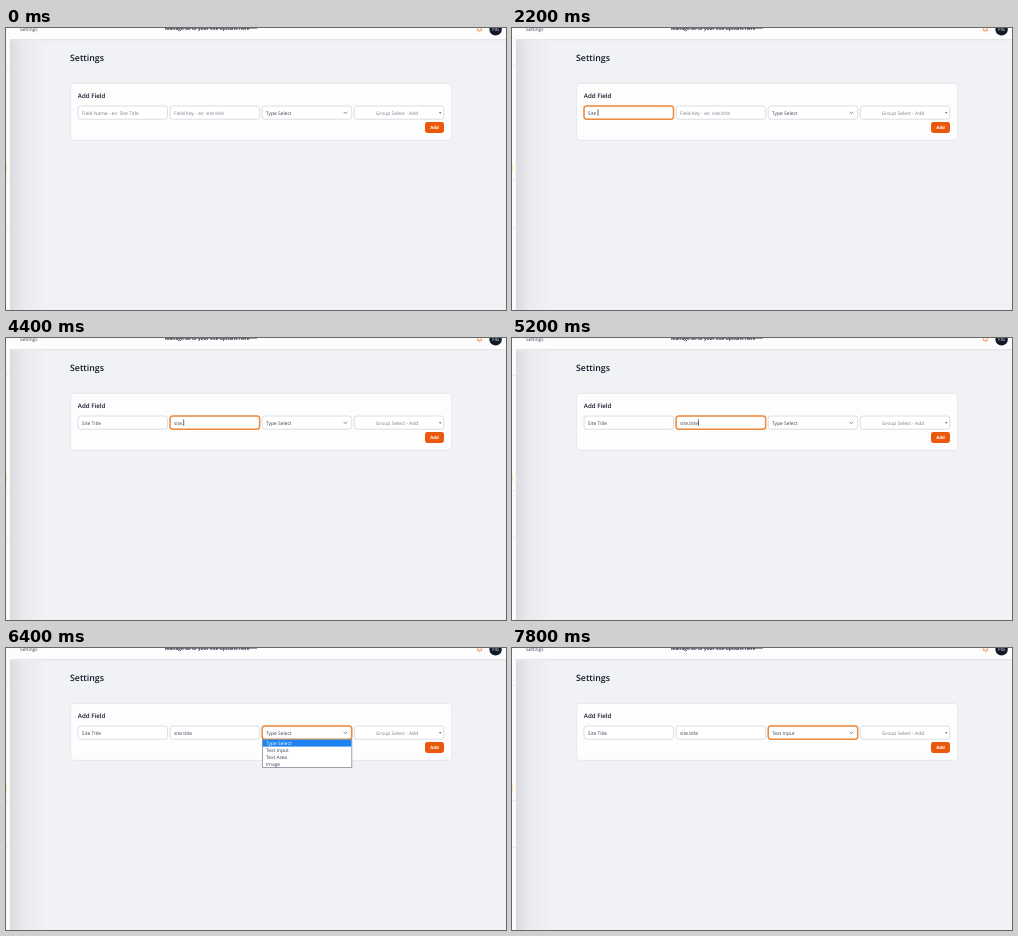
An HTML page that plays this animation: 500 by 282 pixels, repeating every 8 s.

```html
<!DOCTYPE html>
<html lang="en">
<head>
<meta charset="utf-8">
<title>Settings form</title>
<style>
  html, body { margin: 0; width: 100%; height: 100%; overflow: hidden; background: #f0f2f5; }
  svg { display: block; width: 500px; height: 282px; }
  text { font: 4.9px "Open Sans", "Noto Sans", sans-serif; fill: #374151; white-space: pre; text-rendering: geometricPrecision; }
  .bold { font-weight: 600; fill: #111827; }
  .white { fill: #fff; }
  .hint { fill: #7b818c; }
  .box { fill: #fff; stroke: #d3d6db; stroke-width: .8; }
  .ring { fill: none; stroke: #f08a3c; stroke-width: 1.5; }
  .line { fill: none; stroke: #4b5563; stroke-width: .7; stroke-linecap: round; stroke-linejoin: round; }
</style>
</head>
<body>
<svg viewBox="0 0 500 282">
  <defs>
    <linearGradient id="side"><stop stop-color="#d9dbde"/><stop offset=".35" stop-color="#e8eaed"/><stop offset="1" stop-color="#f0f2f5"/></linearGradient>
    <linearGradient id="under" x2="0" y2="1"><stop stop-color="#dfe1e4"/><stop offset="1" stop-color="#f0f2f5" stop-opacity="0"/></linearGradient>
  </defs>

  <rect width="500" height="282" fill="#f0f2f5"/>
  <rect x="4" width="36" height="282" fill="url(#side)"/>
  <rect x="4" y="11" width="496" height="3" fill="url(#under)"/>
  <rect width="500" height="11" fill="#fdfdfe"/>
  <rect width="3.6" height="282" fill="#fcfcfd"/>
  <path d="M0 37.5H3.6M0 152.5H3.6M0 199.5H3.6" stroke="#e5e7eb" stroke-width=".7"/>
  <rect y="136" width="1" height="8" fill="#fdeeb0"/>

  <text x="14" y="2.9" style="font-size:4.7px">Settings</text>
  <text x="159" y="1.8" class="bold">Manage all of your site options here</text>
  <path d="M159 .3H251" stroke="#4b5563" stroke-width=".7"/>
  <path d="M471 2.3H476L475.2 1V-2H471.8V1ZM472.6 3.2Q473.5 4.3 474.4 3.2" fill="none" stroke="#f58a45" stroke-width=".8"/>
  <circle cx="489.6" cy="1.4" r="6.2" fill="#111827"/>
  <text x="489.6" y="3.1" class="white" text-anchor="middle" style="font-size:4.4px">FIG</text>

  <text x="64" y="33" class="bold" style="font-size:8.8px">Settings</text>
  <rect x="64.6" y="55.4" width="381" height="57" rx="3.5" fill="#fdfdfe" stroke="#e3e5e9" stroke-width=".8"/>
  <text x="71.8" y="69.9" class="bold" style="font-size:6.2px">Add Field</text>

  <g id="fields"></g>
  <path class="line" d="M337.8 84.1L339.4 85.7L341 84.1"/>
  <path d="M432.9 84.2H435.5L434.2 85.8Z" fill="#4b5563"/>
  <rect x="419" y="94" width="19" height="11" rx="2.4" fill="#ea580c"/>
  <text x="428.5" y="101.2" class="white" text-anchor="middle" style="font-size:4.4px;font-weight:700">Add</text>
  <rect id="caret" y="81.4" width=".7" height="6.4" fill="#1f2937"/>

  <g id="menu">
    <rect x="256.4" y="91.4" width="89.4" height="28" fill="#fff" stroke="#858b95" stroke-width=".8"/>
    <rect id="mark" x="256.8" width="88.6" height="6.8" fill="#1e83f0"/>
  </g>
</svg>
<script>
const LOOP = 8000;
const $ = id => document.getElementById(id);

function add(parent, tag, attrs, content = "") {
  const el = document.createElementNS("http://www.w3.org/2000/svg", tag);
  for (const name in attrs) el.setAttribute(name, attrs[name]);
  el.textContent = content;
  return parent.appendChild(el);
}

const hints = ["Field Name - ex: Site Title", "Field Key - ex: site.title", "Type Select", "Group Select - Add"];
const fields = hints.map((hint, i) => {
  const x = 72 + 92.1 * i, frame = { x, y: 78, width: 89.5, height: 13.2, rx: 2.6 };
  add($("fields"), "rect", { ...frame, class: "box" });
  const ring = add($("fields"), "rect", { ...frame, class: "ring" });
  const centred = i === 3;
  const label = add($("fields"), "text", {
    x: centred ? 391 : x + 3.8, y: 86.6, "text-anchor": centred ? "middle" : "start"
  }, hint);
  label.classList.toggle("hint", i !== 2);
  return { x: x + 3.8, hint, ring, label };
});

const options = ["Type Select", "Text Input", "Text Area", "Image"];
const rowY = i => 91.8 + 6.9 * i;
const optionLabels = options.map((name, i) => add($("menu"), "text", { x: 260, y: rowY(i) + 5.1 }, name));

// Each pair is a time and the number of characters typed by then.
const nameKeys = [[1200, 1], [1800, 2], [2000, 4], [2200, 5], [2600, 6], [2800, 8], [3000, 9], [3200, 10]];
const keyKeys = [[4000, 1], [4200, 4], [4400, 5], [4600, 6], [4800, 7], [5000, 9], [5200, 10]];
const typed = (text, keys, t) => text.slice(0, keys.reduce((n, [at, count]) => t >= at ? count : n, 0));

function setInput(field, value) {
  field.label.textContent = value || field.hint;
  field.label.classList.toggle("hint", !value);
}

function draw(t) {
  setInput(fields[0], typed("Site Title", nameKeys, t));
  setInput(fields[1], typed("site.title", keyKeys, t));
  fields[2].label.textContent = options[t < 7800 ? 0 : 1];

  const handover = t < 5600 ? 0 : t < 5800 ? 0.5 : 1;
  const focus = [t >= 800 && t < 3600 ? 1 : 0, t >= 3600 ? 1 - handover : 0, handover, 0];
  fields.forEach((field, i) => field.ring.setAttribute("opacity", focus[i]));

  const active = fields[t < 3600 ? 0 : 1];
  const empty = active.label.textContent === active.hint;
  $("caret").setAttribute("x", active.x + (empty ? 0 : active.label.getComputedTextLength() + 0.2));
  $("caret").setAttribute("visibility", t >= 800 && t < 5600 ? "visible" : "hidden");

  const chosen = t < 7400 ? 0 : 1;
  $("menu").setAttribute("visibility", t >= 6400 && t < 7800 ? "visible" : "hidden");
  $("mark").setAttribute("y", rowY(chosen));
  optionLabels.forEach((label, i) => label.classList.toggle("white", i === chosen));
}

function tick() {
  draw(performance.now() % LOOP);
  requestAnimationFrame(tick);
}
tick();
</script>
</body>
</html>
```
